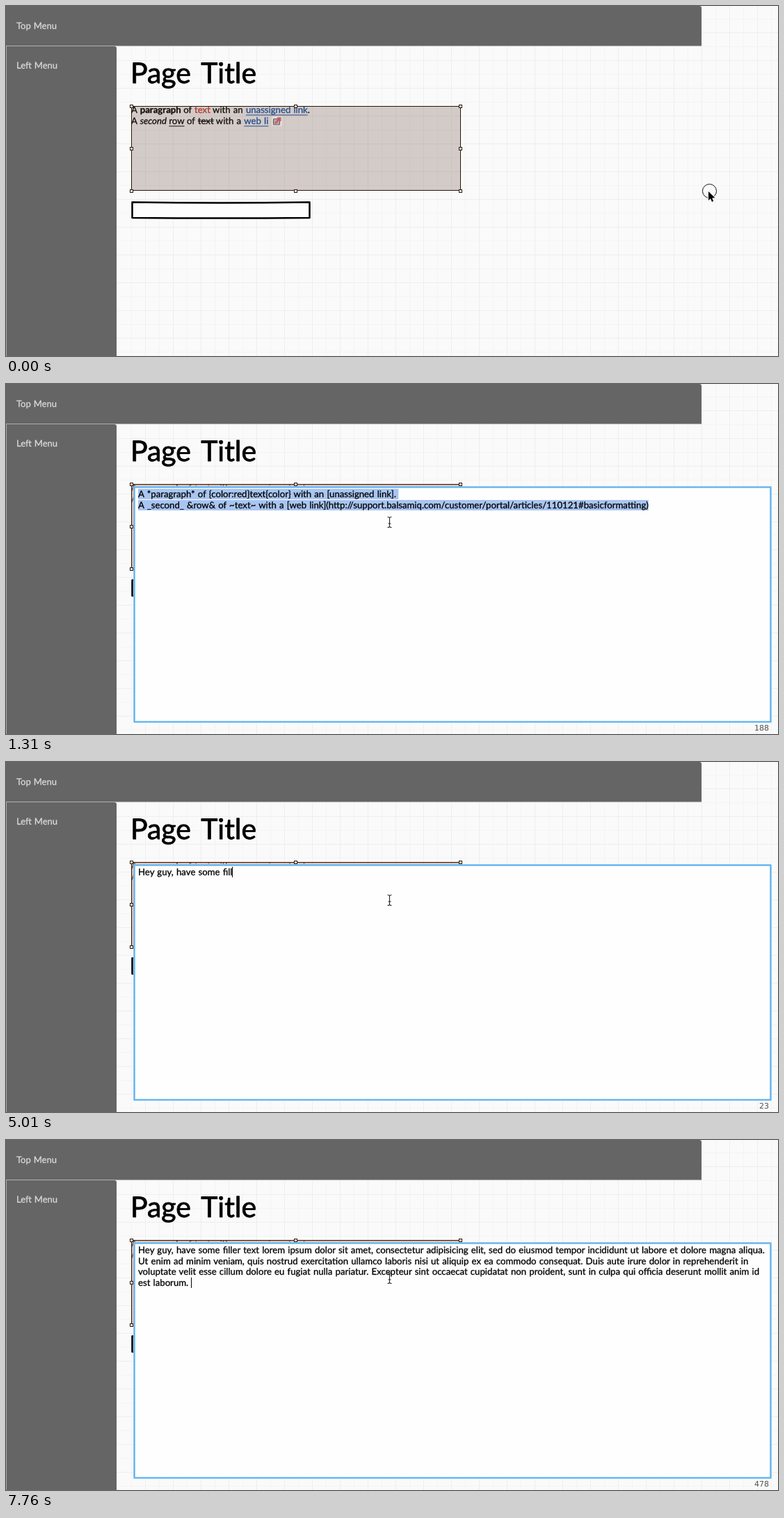
Recreate the animation shown at these times as an HTML page with a canvas. Size 1110 by 504 pixels, loop 8 s.

```html
<!DOCTYPE html>
<html lang="en">
<head>
<meta charset="utf-8">
<title>Wireframe text editing</title>
<style>
  html, body { margin: 0; width: 100%; height: 100%; overflow: hidden; background: #fafafa; }
  canvas { display: block; }
</style>
</head>
<body>
<canvas id="stage" width="1110" height="504"></canvas>
<script>
const ctx = document.getElementById('stage').getContext('2d');
const LOOP = 8000;
const FACE = 'Lato, "Open Sans", sans-serif';
const BODY = `13.2px ${FACE}`;
const DARK = '#2c1608', GREY = '#656565', SLATE = '#4c5763', LINK = '#1450a8';

const MARKUP = [
  'A *paragraph* of {color:red}text{color} with an [unassigned link].',
  'A _second_ &row& of ~text~ with a [web link](http://support.balsamiq.com/customer/portal/articles/110121#basicformatting)'
].join('\n');

const FILLER = [
  'Hey guy, have some filler text lorem ipsum dolor sit amet, consectetur adipisicing elit, sed do eiusmod tempor incididunt ut labore et dolore magna aliqua.',
  'Ut enim ad minim veniam, quis nostrud exercitation ullamco laboris nisi ut aliquip ex ea commodo consequat. Duis aute irure dolor in reprehenderit in',
  'voluptate velit esse cillum dolore eu fugiat nulla pariatur. Excepteur sint occaecat cupidatat non proident, sunt in culpa qui officia deserunt mollit anim id',
  'est laborum. '
].join('\n');

const RICH_LINES = [
  [['A '], ['paragraph', { style: 'bold' }], [' of '], ['text', { color: '#d8321c' }], [' with an '],
   ['unassigned link', { color: LINK, line: 2.5 }], ['.']],
  [['A '], ['second', { style: 'italic' }], [' '], ['row', { line: 2.5 }], [' of '],
   ['text', { line: -4 }], [' with a '], ['web li', { color: LINK, line: 2.5 }]]
];

const OPEN = 1310, PASTE = 6810, CARET_OFF = 7290, LAST_KEY = 7760;
const POINTER_STEP = 118;

// Typing rhythm: time and characters present, with short pauses between.
const TYPING = [[2870, 1], [3460, 7], [3700, 8], [5250, 26], [5490, 27], [6690, 35]];
const FIRST_KEY = TYPING[0][0];

const progress = (t, from, to) => Math.min(1, Math.max(0, (t - from) / (to - from)));
const mix = (a, b, k) => a + (b - a) * k;
const easeInOut = k => k * k * (3 - 2 * k);

function path(points) {
  ctx.beginPath();
  points.forEach(([x, y]) => ctx.lineTo(x, y));
}

function rect(x, y, w, h, fill) {
  ctx.fillStyle = fill;
  ctx.fillRect(x, y, w, h);
}

function roundRect(x, y, w, h, radius, fill) {
  ctx.beginPath();
  ctx.roundRect(x, y, w, h, radius);
  ctx.fillStyle = fill;
  ctx.fill();
}

function stroke(color, width) {
  ctx.strokeStyle = color;
  ctx.lineWidth = width;
  ctx.stroke();
}

function frame(x, y, w, h, color, width) {
  ctx.beginPath();
  ctx.rect(x, y, w, h);
  stroke(color, width);
}

function setFont(font, space) {
  ctx.font = font;
  ctx.wordSpacing = space + 'px';
}

function text(str, x, y, { font = BODY, color = '#000', space = 0.8, weight = 0.3, align = 'left' } = {}) {
  setFont(font, space);
  ctx.textAlign = align;
  ctx.fillStyle = ctx.strokeStyle = color;
  ctx.fillText(str, x, y);
  if (weight) { ctx.lineWidth = weight; ctx.strokeText(str, x, y); }
  return ctx.measureText(str).width;
}

function bodyWidth(str) {
  setFont(BODY, 0.8);
  return ctx.measureText(str).width;
}

function drawGrid() {
  const shade = i => i % 2 ? '#f4f4f4' : '#eeeeee';
  rect(0, 0, 1110, 504, '#fafafa');
  for (let i = 0; i < 56; i++) rect(i * 20, 0, 1, 504, shade(i));
  for (let i = 0; i < 25; i++) rect(0, 18 + i * 20, 1110, 1, shade(i + 1));
}

function drawMenus() {
  rect(0, 56, 159, 4, '#fdfdfd');
  roundRect(0, 0, 1000, 57.5, [0, 3, 0, 0], GREY);
  roundRect(0.5, 58, 158.5, 450, [0, 3, 0, 0], GREY);
  const label = { font: `13px ${FACE}`, color: '#dcdcdc', space: 0.6, weight: 0.25 };
  text('Top Menu', 15, 33, label);
  text('Left Menu', 15, 90, label);
}

function drawField() {
  const left = 181.5, right = 436.5, top = 282.5, bottom = 305;
  const middle = (left + right) / 2;
  ctx.beginPath();
  ctx.moveTo(left, top);
  ctx.quadraticCurveTo(middle, top + 2, right, top);
  ctx.lineTo(right, bottom);
  ctx.quadraticCurveTo(middle, bottom + 1, left, bottom);
  ctx.closePath();
  ctx.fillStyle = '#fdfdfd';
  ctx.fill();
  ctx.lineJoin = 'round';
  stroke('#000', 2.5);
}

function drawRichText() {
  RICH_LINES.forEach((parts, row) => {
    let x = 180;
    const y = 154 + row * 16;
    for (const [str, { style = '', color = '#000', line } = {}] of parts) {
      const w = text(str, x, y, { font: `${style} ${BODY}`, color });
      if (line) rect(x, Math.round(y + line) - 0.5, w, 1, color);
      x += w;
    }
  });
}

function drawLinkIcon() {
  roundRect(382, 159, 15, 14, 3, '#e6dedd');
  roundRect(384.5, 162.5, 9, 8.5, 1, '#b5a5a6');
  stroke('#6d6266', 1.2);
  path([[387, 169], [394, 161.5]]);
  stroke('#d0555a', 2.4);
  path([[390, 161], [395, 161], [395, 166]]);
  stroke('#d0555a', 1.3);
}

function drawSelection(editing) {
  rect(181, 145, 472, 121, editing ? 'rgba(170,85,45,.36)' : 'rgba(90,60,50,.25)');
  frame(180.5, 144.5, 473, 121, DARK, 1);
  for (let i = 0; i < 9; i++) {
    if (i === 4) continue;
    const x = Math.floor(180 + (i % 3) * 236.5), y = 144 + Math.floor(i / 3) * 61;
    rect(x - 2, y - 2, 5, 5, DARK);
    rect(x - 1, y - 1, 3, 3, '#fff');
  }
}

function drawPage(editing) {
  drawGrid();
  drawMenus();
  text('Page Title', 179, 111, { font: `41px ${FACE}`, space: 5, weight: 0.8 });
  drawField();
  ctx.globalAlpha = editing ? 0.6 : 1;
  drawRichText();
  ctx.globalAlpha = 1;
  drawSelection(editing);
  if (!editing) drawLinkIcon();
}

function typedCount(t) {
  if (t >= LAST_KEY) return FILLER.length;
  if (t >= PASTE) return FILLER.length - 1;
  const next = TYPING.findIndex(([time]) => time > t);
  if (next < 0) return TYPING.at(-1)[1];
  const [t0, n0] = TYPING[next - 1], [t1, n1] = TYPING[next];
  return Math.floor(mix(n0, n1, progress(t, t0, t1)));
}

function drawEditor(t) {
  const selected = t < FIRST_KEY;
  const content = selected ? MARKUP : FILLER.slice(0, typedCount(t));
  const lines = content.split('\n');

  rect(185, 149, 914, 337, '#fefefe');
  frame(184.5, 148.5, 915, 338, '#a5d2f5', 3);
  frame(184.5, 148.5, 915, 338, '#5eb2f0', 1.6);

  lines.forEach((line, i) => {
    if (selected) rect(190, 151 + i * 16, bodyWidth(line) + (i ? 0 : 3.5), 15, '#a9c5f1');
    text(line, 190, Math.round(163 + i * 15.7));
  });
  if (!selected && (t < CARET_OFF || t >= LAST_KEY)) {
    const row = lines.length - 1;
    rect(Math.round(190 + bodyWidth(lines[row])), Math.round(151 + row * 15.5), 1, 15, '#000');
  }
  text(content.length, 1097, 499, { font: '11px "DejaVu Sans", sans-serif', color: '#505050', weight: 0, align: 'right' });
}

function outlinedFill(fill) {
  ctx.closePath();
  ctx.lineJoin = 'round';
  stroke('#fff', 2);
  ctx.fillStyle = fill;
  ctx.fill();
}

function drawArrow(x, y, fill) {
  const shape = [[0, 0], [0, 13], [3, 10.3], [5, 15], [7.2, 14], [5.2, 9.6], [9.3, 9.3]];
  path(shape.map(([dx, dy]) => [x + dx, y + dy]));
  outlinedFill(fill);
}

function drawMoveGlyph(x, y) {
  const arm = [[-0.6, -1], [-0.6, -2.6], [-2, -2.6], [0, -5], [2, -2.6], [0.6, -2.6], [0.6, -1]];
  path([0, 1, 2, 3].flatMap(quarter => {
    const c = Math.cos(quarter * Math.PI / 2), s = Math.sin(quarter * Math.PI / 2);
    return arm.map(([dx, dy]) => [x + dx * c - dy * s, y + dx * s + dy * c]);
  }));
  outlinedFill(SLATE);
}

function drawBeam(x, y) {
  path([[x, y - 6.5], [x, y + 6.5]]);
  for (const side of [-1, 1]) {
    ctx.moveTo(x - 3, y + side * 7.5);
    ctx.quadraticCurveTo(x, y + side * 7.5, x, y + side * 6);
    ctx.quadraticCurveTo(x, y + side * 7.5, x + 3, y + side * 7.5);
  }
  ctx.moveTo(x - 2, y + 2);
  ctx.lineTo(x + 2, y + 2);
  stroke('#222', 1.1);
}

function drawPointer(t) {
  if (t >= OPEN) return drawBeam(551.5, 199);
  const stepped = Math.floor(t / POINTER_STEP) * POINTER_STEP;
  const glide = easeInOut(progress(stepped, 0, 590));
  const nudge = progress(stepped, 700, 1180) ** 2;
  const x = mix(1010, 493, glide) + 24 * nudge;
  const y = mix(267, 181, glide) + 8 * nudge;
  if (!glide) {
    ctx.beginPath();
    ctx.arc(1011.5, 266.5, 10, 0, Math.PI * 2);
    stroke('#111', 1);
  }
  const overText = x < 653;
  drawArrow(x, y, overText ? SLATE : '#000');
  if (overText) drawMoveGlyph(x + 11, y + 11);
}

function render(t) {
  const editing = t >= OPEN;
  drawPage(editing);
  if (editing) drawEditor(t);
  drawPointer(t);
}

ctx.textRendering = 'geometricPrecision';
const begin = performance.now();
function tick() {
  render((performance.now() - begin) % LOOP);
  requestAnimationFrame(tick);
}
tick();
</script>
</body>
</html>
```
